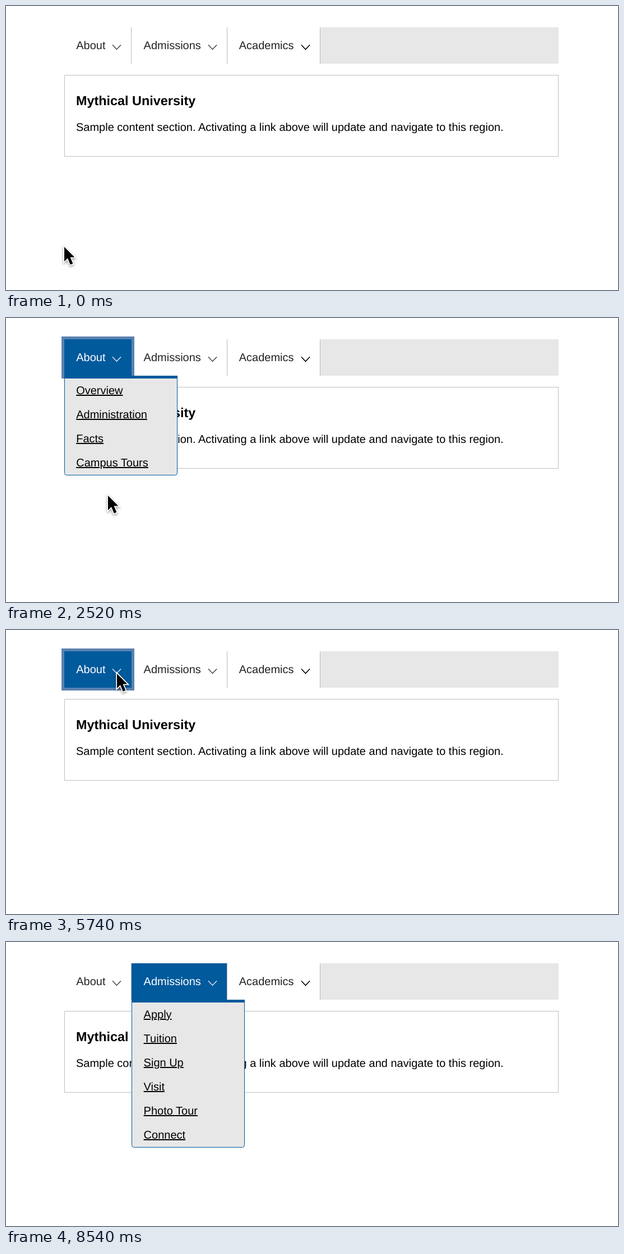
These frames come from a looping animation (1092 by 507 pixels, 9310 ms). An HTML page:

```html
<!DOCTYPE html>
<html lang="en">
<head>
<meta charset="utf-8">
<title>Fly-out navigation menu</title>
<style>
  html, body { margin: 0; width: 100%; height: 100%; overflow: hidden; background: #fff; }
  svg { display: block; width: 1092px; height: 507px; }
  text { font: 20px "Liberation Sans", Arial, sans-serif; text-rendering: geometricPrecision; fill: #000; }
  .title { font-size: 23.4px; font-weight: bold; }
  .link { text-decoration: underline; }
  .label { fill: #222; }
  .chevron { fill: none; stroke: #222; stroke-width: 1.1; }
  .bold .chevron { stroke: #000; stroke-width: 1.6; }
  .back { fill: none; }
  .active .back { fill: #005a9c; }
  .active .label { fill: #fff; }
  .active .chevron { stroke: #fff; }
  .arrow { filter: drop-shadow(0 2px 2px rgba(0, 0, 0, .4)); }
</style>
</head>
<body>
<svg id="stage" viewBox="0 0 1092 507">
  <rect width="1092" height="507" fill="#fff"/>
  <rect x="561" y="38" width="425" height="65" fill="#e7e7e7"/>
  <path d="M223.5 38V103M394.5 38V103M560.5 38V103" stroke="#bbb"/>
  <rect x="104.5" y="123.5" width="881" height="145" fill="none" stroke="#bfbfbf"/>
  <text class="title" x="125" y="177">Mythical University</text>
  <text x="125" y="223">Sample content section. Activating a link above will update and navigate to this region.</text>
  <g id="tabs"></g>
  <g id="menus"></g>
  <g id="cursor">
    <path class="arrow" d="M0 0V26L6 20.3L10.8 31.8L15.4 29.8L10.6 18.6H18.4Z"
      fill="#000" stroke="#fff" stroke-width="3.4" paint-order="stroke"/>
  </g>
</svg>
<script>
const LOOP = 9310, STEP = 70;
const NS = "http://www.w3.org/2000/svg";
const byId = id => document.getElementById(id);

const tabs = [
  { name: "About", x: 104, w: 119, textX: 125.2, mark: 197.5,
    links: ["Overview", "Administration", "Facts", "Campus Tours"],
    focus: [[1260, 2940], [4970, 6090]], open: [[1330, 5040]] },
  { name: "Admissions", x: 224, w: 170, textX: 245.6, mark: 368.5,
    links: ["Apply", "Tuition", "Sign Up", "Visit", "Photo Tour", "Connect"],
    focus: [[6860, 8540]], open: [[7000, LOOP]] },
  { name: "Academics", x: 395, w: 165, textX: 415.7, mark: 534.5,
    links: [], focus: [], open: [], bold: true }
];

// Pointer stops: time, x, y
const stops = [
  [0, 104, 430], [280, 104, 430], [1050, 196, 82], [1330, 198, 78],
  [1680, 198, 78], [2520, 182, 317], [2730, 180, 356],
  [3920, 180, 356], [4410, 189, 81], [4760, 198, 78],
  [5740, 198, 78], [6020, 218, 331],
  [6300, 218, 331], [6860, 358, 54],
  [7140, 358, 54], [8120, 141, 450], [8400, 136, 510], [LOOP, 136, 510]
];

function add(parent, tag, attrs, text) {
  const el = document.createElementNS(NS, tag);
  for (const key in attrs) el.setAttribute(key, attrs[key]);
  if (text) el.textContent = text;
  parent.appendChild(el);
  return el;
}

function build(tab) {
  const { x, w, mark } = tab;
  tab.el = add(byId("tabs"), "g", { class: tab.bold ? "bold" : "" });
  tab.ring = add(tab.el, "rect", { x: x - 5, y: 33, width: w + 11, height: 75, fill: "#5a81af" });
  tab.back = add(tab.el, "rect", { class: "back", x, y: 38, height: 65 });
  add(tab.el, "text", { class: "label", x: tab.textX, y: 77 }, tab.name);
  add(tab.el, "path", { class: "chevron", d: `M${mark - 7.5} 69.5l7.5 8l7.5 -8` });

  tab.menu = add(byId("menus"), "g", {});
  if (!tab.links.length) return;
  const bottom = 108.5 + 43 * tab.links.length;
  add(tab.menu, "path", {
    d: `M${x + .5} 105V${bottom - 4}q0 4 4 4h193q4 0 4 -4V105Z`,
    fill: "#e7e7e7", stroke: "#005a9c"
  });
  add(tab.menu, "rect", { x, y: 103, width: 202, height: 5, fill: "#005a9c" });
  tab.links.forEach((name, i) =>
    add(tab.menu, "text", { class: "link", x: tab.textX, y: 136 + 43 * i }, name));
}

// Monotone cubic through the stops, so rests stay still
function speed(i, k) {
  if (i < 1 || i >= stops.length - 1) return 0;
  const rate = j => (stops[j + 1][k] - stops[j][k]) / (stops[j + 1][0] - stops[j][0]);
  const a = rate(i - 1), b = rate(i);
  return a * b > 0 ? 2 * a * b / (a + b) : 0;
}

function pointer(t) {
  let i = 0;
  while (i < stops.length - 2 && t >= stops[i + 1][0]) i++;
  const p = stops[i], q = stops[i + 1], d = q[0] - p[0], u = (t - p[0]) / d;
  const s = u * u * (3 - 2 * u), v = 1 - u;
  return [1, 2].map(k =>
    p[k] + (q[k] - p[k]) * s + d * (u * v * v * speed(i, k) - u * u * v * speed(i + 1, k)));
}

const within = (spans, t) => spans.some(([a, b]) => t >= a && t < b);
const show = (el, on) => el.setAttribute("visibility", on ? "visible" : "hidden");

function draw(ms) {
  const t = Math.floor(ms % LOOP / STEP) * STEP;
  const [px, py] = pointer(t);
  byId("cursor").setAttribute("transform", `translate(${px.toFixed(1)} ${py.toFixed(1)})`);
  for (const tab of tabs) {
    const focus = within(tab.focus, t), open = within(tab.open, t);
    const hover = px >= tab.x && px < tab.x + tab.w && py >= 38 && py < 103;
    show(tab.ring, focus);
    show(tab.menu, open);
    tab.back.setAttribute("width", tab.w + (focus ? 1 : 0));
    tab.el.classList.toggle("active", focus || open || hover);
  }
}

tabs.forEach(build);
draw(0);
let start;
requestAnimationFrame(function tick(now) {
  start ??= now;
  draw(now - start);
  requestAnimationFrame(tick);
});
</script>
</body>
</html>
```
